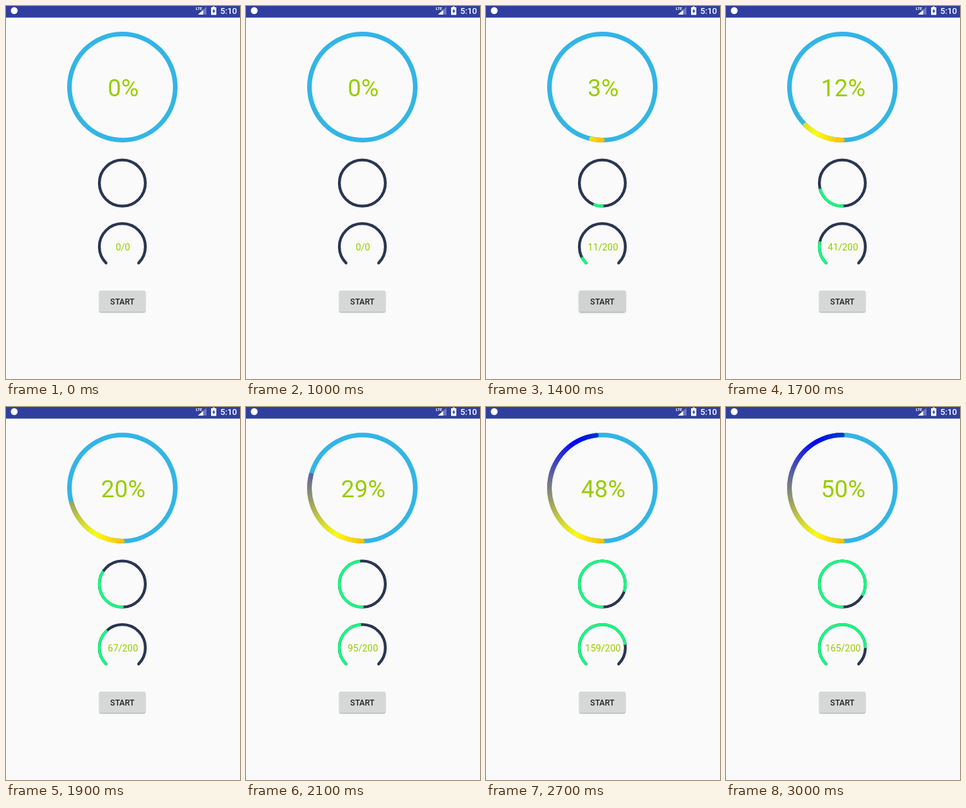
Recreate the animation shown at these times as an HTML page with a canvas. Size 356 by 566 pixels, loop 4.2 s.

```html
<!DOCTYPE html>
<html lang="en">
<head>
<meta charset="utf-8">
<title>Circular progress</title>
<style>
  html, body { margin: 0; width: 100%; height: 100%; overflow: hidden; background: #fafafa; }
  canvas, svg { position: absolute; left: 0; top: 0; width: 356px; height: 566px; }
  text { font-family: Roboto, sans-serif; text-anchor: middle; }
  .value { fill: #99cc00; }
  #button {
    position: absolute; left: 142px; top: 432px; width: 70px; height: 32px;
    border-radius: 2px; background: #d6d7d7;
    box-shadow: 0 1px 2px rgba(0, 0, 0, .38);
  }
  #button.pressed { background: #d1d3d2; box-shadow: 0 1px 3px rgba(0, 0, 0, .42); }
</style>
</head>
<body>
<canvas id="rings"></canvas>
<div id="button"></div>
<svg viewBox="0 0 356 566">
  <rect width="356" height="17.6" fill="#303f9f"/>
  <g fill="#fff">
    <circle cx="12.5" cy="7" r="5.2"/>
    <text x="293.5" y="6" font-size="6" font-weight="700">LTE</text>
    <path d="M305 1V13H292Z" opacity=".3"/>
    <path d="M300 6V13H292Z"/>
    <path d="M314.5 2V.8h3V2H320v11.5h-8V2Z"/>
    <path d="M316.7 3.8 313.7 8.5h1.8v3.2l3-4.8h-1.8Z" fill="#303f9f"/>
    <text x="338.7" y="12" font-size="13" font-weight="500">5:10</text>
  </g>
  <text id="percent" class="value" x="178.3" y="137" font-size="36.4">0%</text>
  <text id="count" class="value" x="177.9" y="371" font-size="14.3">0/0</text>
  <text x="177" y="453" font-size="12.2" font-weight="500" fill="#212121">START</text>
</svg>
<script>
const LOOP = 4200, STEP = 100, BEGIN = 1097, DURATION = 1825;
const CX = 177, TOTAL = 200, GOAL = 165;
const byId = id => document.getElementById(id);
const canvas = byId('rings'), ctx = canvas.getContext('2d');
const percent = byId('percent'), count = byId('count'), button = byId('button');
const scale = Math.max(1, devicePixelRatio || 1);
canvas.width = 356 * scale;
canvas.height = 566 * scale;
ctx.scale(scale, scale);
ctx.lineCap = 'round';

const sweepColors = ctx.createConicGradient(0, CX, 123);
['#f00', '#ff0', '#00f', '#0f0'].forEach((color, i) => sweepColors.addColorStop(i / 3, color));

function arc(y, radius, start, sweep, width, color) {
  const from = start * Math.PI / 180;
  ctx.beginPath();
  ctx.arc(CX, y, radius, from, from + sweep * Math.PI / 180);
  ctx.lineWidth = width;
  ctx.strokeStyle = color;
  ctx.stroke();
}

function dial(y, radius, start, span, share, width, track, color) {
  arc(y, radius, start, span, width, track);
  if (share > .001) arc(y, radius, start, span * share, width, color);
}

function draw(time) {
  const x = Math.min(1, Math.max(0, (time - BEGIN) / DURATION));
  const eased = (1 - Math.cos(Math.PI * x)) / 2;
  const share = eased * GOAL / TOTAL;

  ctx.clearRect(0, 0, 356, 566);
  dial(123, 80.5, 90, 360, eased / 2, 7, '#33b5e5', sweepColors);
  dial(268.7, 35, 90, 360, share, 4.3, '#2a3550', '#17f880');
  dial(365.2, 35, 135, 270, share, 4.3, '#2a3550', '#17f880');

  percent.textContent = Math.round(eased * 50) + '%';
  count.textContent = time < 1100 ? '0/0' : Math.round(eased * GOAL) + '/' + TOTAL;
  button.classList.toggle('pressed', time >= 1100 && time < 1500);
}

const origin = performance.now();
let shown = -1;
function tick() {
  const elapsed = Math.max(0, performance.now() - origin) % LOOP;
  const time = Math.floor(elapsed / STEP) * STEP;
  if (time !== shown) draw(shown = time);
  requestAnimationFrame(tick);
}
tick();
</script>
</body>
</html>
```
